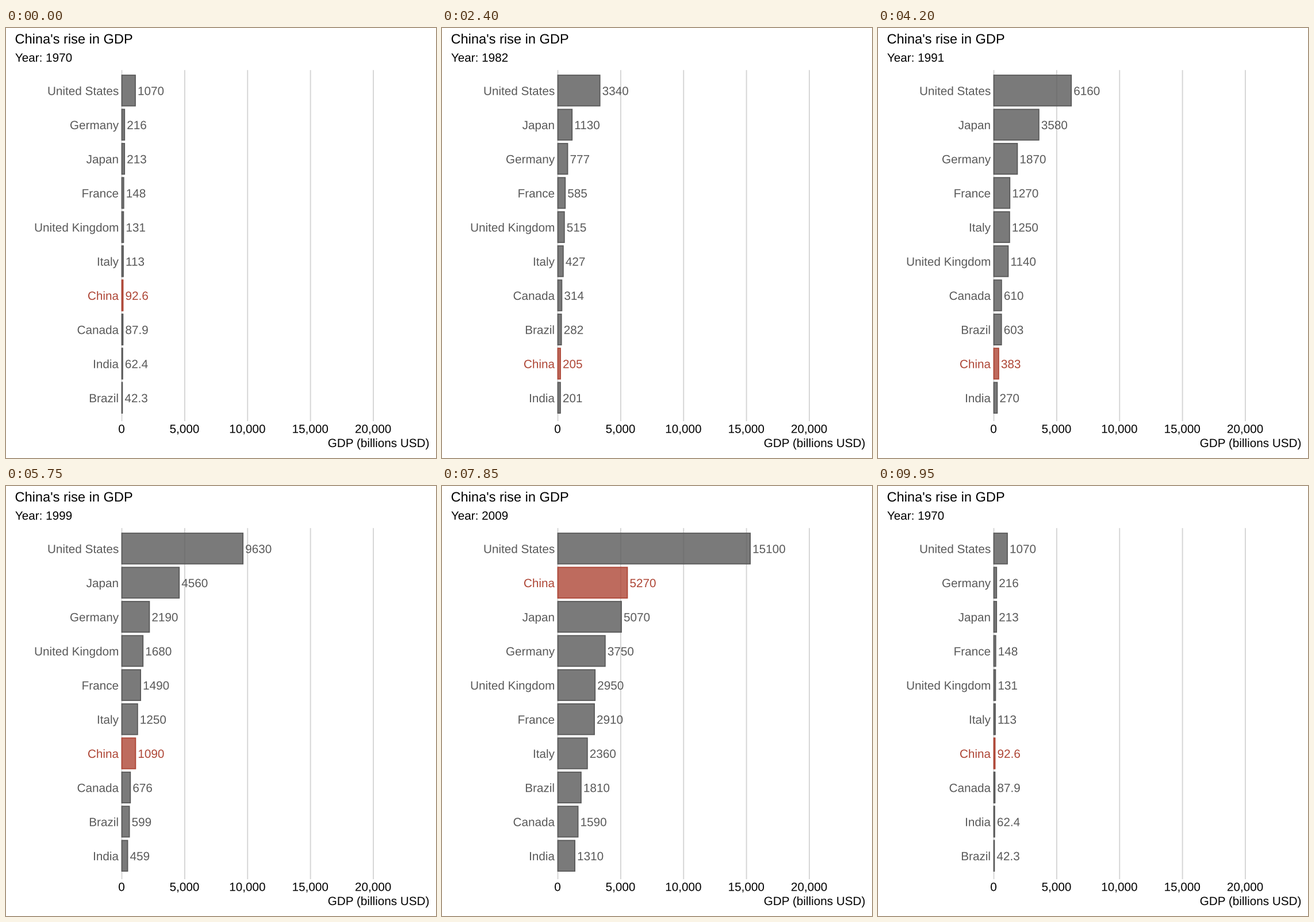
Write a matplotlib script that moves like this. It is 748 px wide and 748 px high and loops after 10 s.

```python
import matplotlib.pyplot as plt
import numpy as np
from matplotlib.animation import FuncAnimation
from matplotlib.colors import to_rgba
from matplotlib.patches import Rectangle
from matplotlib.patheffects import Normal

SIZE, DPI = 748, 100
PX = 72 / DPI  # points per pixel
GREY, RED, GRID = "#595959", "#AE4636", "#D5D5D5"
X0, X_SCALE = 201.5, 0.021875  # pixels per billion USD
Y0, Y_STEP = 108.8, 59.38
BAR_H = 0.9 * Y_STEP
FIRST, N_STATES = 1970, 50
LONG_MOVE, NO_HOLD = 2, 24  # states where the rhythm slips by one frame

# GDP in billions USD at a few key years, with constant growth between them
KEY_YEARS = [1970, 1982, 1991, 1999, 2004, 2008, 2014, 2019]
KEY_GDP = {
    "Brazil": [42.3, 282, 603, 599, 669, 1700, 2460, 1840],
    "Canada": [87.9, 314, 610, 676, 1020, 1550, 1800, 1740],
    "China": [92.6, 205, 383, 1090, 1960, 4590, 10500, 14300],
    "France": [148, 585, 1270, 1490, 2120, 2920, 2850, 2720],
    "Germany": [216, 777, 1870, 2190, 2810, 3730, 3880, 3860],
    "India": [62.4, 201, 270, 459, 709, 1200, 2040, 2870],
    "Italy": [113, 427, 1250, 1250, 1800, 2400, 2160, 2000],
    "Japan": [213, 1130, 3580, 4560, 4820, 5110, 4850, 5080],
    "United Kingdom": [131, 515, 1140, 1680, 2420, 2930, 3060, 2830],
    "United States": [1073, 3344, 6158, 9631, 12217, 14713, 17527, 21433],
}


def yearly(points):
    years = np.arange(FIRST, FIRST + N_STATES)
    return np.exp(np.interp(years, KEY_YEARS, np.log(points)))


def build_schedule():
    """One (state, progress) pair per frame: a short hold, then a linear move."""
    frames = []
    for s in range(N_STATES):
        if s != NO_HOLD:
            frames.append((s, 0.0))
        steps = 4 if s == LONG_MOVE else 3
        frames += [(s, k / steps) for k in range(1, steps + 1)]
    return frames


names = list(KEY_GDP)
values = np.array([yearly(p) for p in KEY_GDP.values()]).T
ranks = np.argsort(np.argsort(-values, axis=1), axis=1)
schedule = build_schedule()

plt.rcParams["font.family"] = "Liberation Sans"
plt.rcParams["text.hinting"] = "none"
fig = plt.figure(figsize=(SIZE / DPI, SIZE / DPI), dpi=DPI, facecolor="white")
ax = fig.add_axes([0, 0, 1, 1])
ax.set_xlim(0, SIZE)
ax.set_ylim(SIZE, 0)
ax.axis("off")


def put(x, y, text="", color="black", size=20.7, ha="left"):
    # the path effect draws outlines, so glyphs sit at fractions of a pixel
    return ax.text(x, y, text, color=color, fontsize=size * PX, ha=ha,
                   va="baseline", zorder=5, path_effects=[Normal()])


put(15.5, 27, "China's rise in GDP", size=23.6)
year_text = put(15.8, 58.6)
put(735.8, 729, "GDP (billions USD)", ha="right")
for tick in range(0, 20001, 5000):
    x = X0 + tick * X_SCALE
    ax.plot([x, x], [73.2, 684], color=GRID, lw=1.9 * PX,
            solid_capstyle="butt", zorder=1, snap=False)
    put(x - 0.5, 704.4, f"{tick:,}", ha="center")

bars, name_texts, value_texts = [], [], []
for name in names:
    color = RED if name == "China" else GREY
    bar = Rectangle((X0, 0), 0, BAR_H, facecolor=to_rgba(color, 0.8),
                    edgecolor=color, lw=1.8 * PX, zorder=2, snap=False)
    bars.append(ax.add_patch(bar))
    name_texts.append(put(195.8, 0, name, color, ha="right"))
    value_texts.append(put(0, 0, color=color))


def draw(frame):
    state, t = schedule[frame]
    following = (state + 1) % N_STATES
    nearest = state if t < 0.5 else following
    year_text.set_text(f"Year: {FIRST + nearest}")
    gdp = (1 - t) * values[state] + t * values[following]
    rank = (1 - t) * ranks[state] + t * ranks[following]
    for i, bar in enumerate(bars):
        y = Y0 + Y_STEP * rank[i]
        width = gdp[i] * X_SCALE
        bar.set_y(y - BAR_H / 2)
        bar.set_width(width)
        name_texts[i].set_y(y + 7.8)
        value_texts[i].set_position((X0 + width + 4, y + 7.8))
        value_texts[i].set_text(f"{float(f'{values[nearest, i]:.3g}'):g}")
    return [year_text, *bars, *name_texts, *value_texts]


anim = FuncAnimation(fig, draw, frames=len(schedule), interval=50,
                     repeat=True, repeat_delay=0)
plt.show()
```
